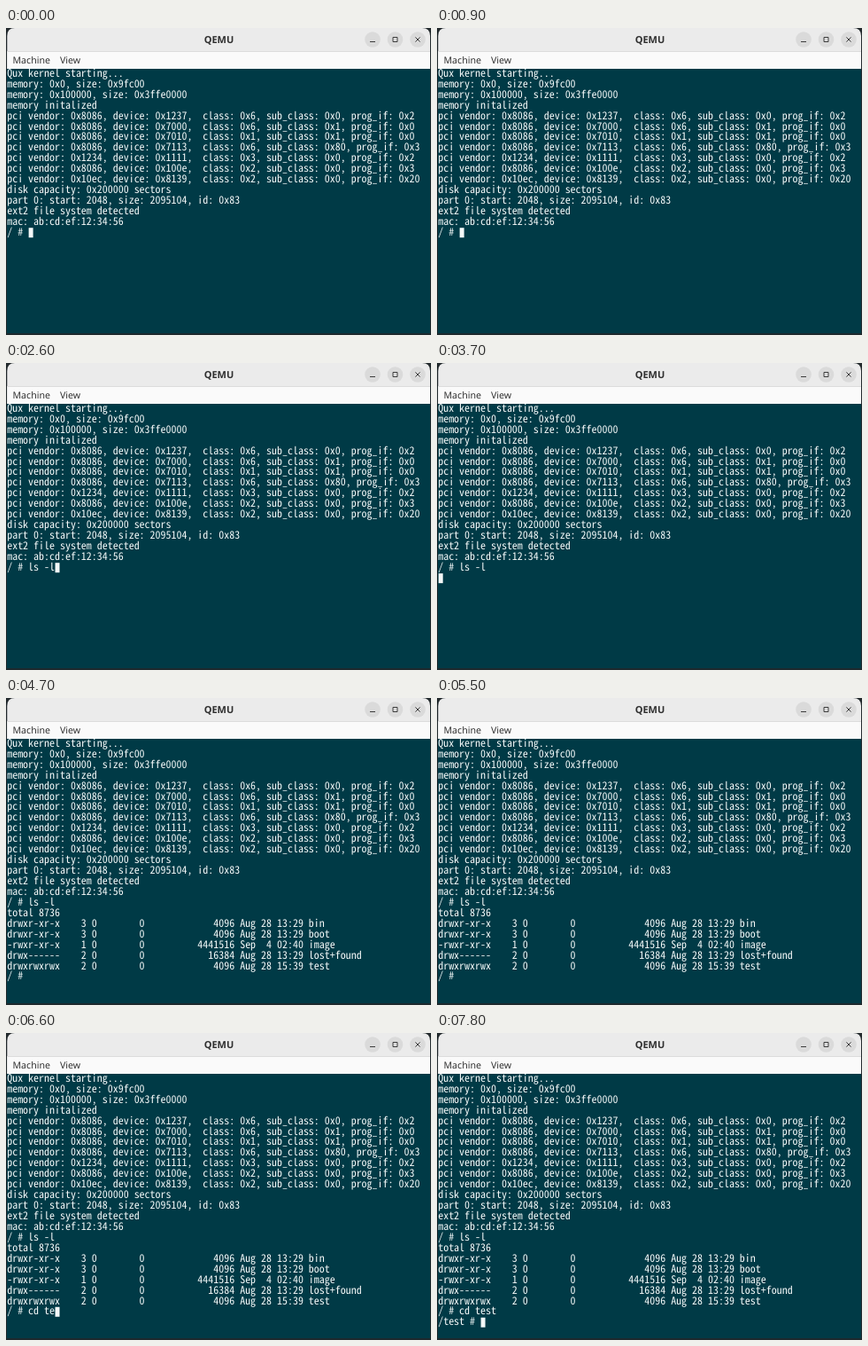
An HTML page for the animation above (8 s loop, 480 by 346 pixels).

```html
<!DOCTYPE html>
<html lang="en">
<head>
<meta charset="utf-8">
<title>Kernel console</title>
<style>
  html, body { margin: 0; width: 100%; height: 100%; overflow: hidden; background: #232a2d; }
  svg { display: block; width: 480px; height: 346px; }
  text { white-space: pre; text-rendering: geometricPrecision; }
  .ui { font: 10.6px "Noto Sans", "Open Sans", sans-serif; fill: #333; }
  .title { font-size: 11px; font-weight: 700; fill: #303030; text-anchor: middle; }
  .term { font-family: "Noto Sans Mono CJK JP", "Noto Sans Mono", "DejaVu Sans Mono", monospace; fill: #f4f8f8; }
</style>
</head>
<body>
<svg viewBox="0 0 480 346">
  <path d="M1.3 346V9Q1.3 0 10 0H470Q479 0 479 9V346Z" fill="#ebebeb"/>
  <path d="M1.3 26H479V46H1.3Z" fill="#fafafa"/>
  <path d="M1.3 26H479V27H1.3Z" fill="#dcdcdc"/>
  <path d="M1 46H479V344H1Z" fill="#003a46"/>
  <path d="M0 344H480V346H0Z" fill="#1d292d"/>
  <g fill="#dadada">
    <circle cx="414" cy="13" r="8.8"/>
    <circle cx="439.5" cy="13" r="8.8"/>
    <circle cx="465" cy="13" r="8.8"/>
  </g>
  <path d="M411 15.5h6M437 10.5h5v5h-5zM462.4 10.4l5.2 5.2M467.6 10.4l-5.2 5.2" fill="none" stroke="#3c3c3c"/>
  <text class="ui title" x="240.5" y="17">QEMU</text>
  <text class="ui" x="7.5" y="40">Machine</text>
  <text class="ui" x="61" y="40">View</text>
  <g class="term" id="term"></g>
  <rect id="cursor" width="5" height="11" fill="#f4f8f8"/>
</svg>
<script>
const LEFT = 1.2, TOP = 45.6, CW = 5.98, LH = 11.94, LOOP = 8000;
const term = document.getElementById('term');
const cursor = document.getElementById('cursor');

const pci = (vendor, device, cls, sub, prog) =>
  `pci vendor: 0x${vendor}, device: 0x${device},  class: 0x${cls}, sub_class: 0x${sub}, prog_if: 0x${prog}`;
const file = (mode, links, size, date, name) =>
  `${mode}    ${links} 0        0${String(size).padStart(17)} ${date} ${name}`;

const boot = [
  'Qux kernel starting...',
  'memory: 0x0, size: 0x9fc00',
  'memory: 0x100000, size: 0x3ffe0000',
  'memory initalized',
  pci('8086', '1237', 6, 0, 2),
  pci('8086', '7000', 6, 1, 0),
  pci('8086', '7010', 1, 1, 0),
  pci('8086', '7113', 6, 80, 3),
  pci('1234', '1111', 3, 0, 2),
  pci('8086', '100e', 2, 0, 3),
  pci('10ec', '8139', 2, 0, 20),
  'disk capacity: 0x200000 sectors',
  'part 0: start: 2048, size: 2095104, id: 0x83',
  'ext2 file system detected',
  'mac: ab:cd:ef:12:34:56',
  '/ # '
].join('\n');

const listing = boot + [
  'ls -l',
  'total 8736',
  file('drwxr-xr-x', 3, 4096, 'Aug 28 13:29', 'bin'),
  file('drwxr-xr-x', 3, 4096, 'Aug 28 13:29', 'boot'),
  file('-rwxr-xr-x', 1, 4441516, 'Sep  4 02:40', 'image'),
  file('drwx------', 2, 16384, 'Aug 28 13:29', 'lost+found'),
  file('drwxrwxrwx', 2, 4096, 'Aug 28 15:39', 'test'),
  '/ # '
].join('\n');

// [start time, screen text, cursor visible]
const steps = [
  [0, boot, 1], [600, boot, 0], [900, boot, 1], [1600, boot, 0], [1900, boot, 1],
  [2000, boot + 'l', 1], [2100, boot + 'ls', 1], [2300, boot + 'ls ', 1],
  [2400, boot + 'ls -', 1], [2600, boot + 'ls -l', 1],
  [3600, boot + 'ls -l\n', 0], [3700, boot + 'ls -l\n', 1],
  [4700, listing, 0], [4800, listing, 1], [5500, listing, 0], [5800, listing, 1],
  [6100, listing + 'c', 1],
  ...[2, 3, 4, 5, 6, 7].map((n, i) => [6300 + i * 100, listing + 'cd test'.slice(0, n), 1]),
  [7000, listing + 'cd test\n/test # ', 0], [7800, listing + 'cd test\n/test # ', 1]
];

// Choose the font size whose natural advance equals one console cell.
const ctx = document.createElement('canvas').getContext('2d');
ctx.font = '100px ' + getComputedStyle(term).fontFamily;
term.style.fontSize = CW * 100 / ctx.measureText('0').width + 'px';

const rows = Array.from({ length: 25 }, (_, i) => {
  const row = document.createElementNS('http://www.w3.org/2000/svg', 'text');
  row.setAttribute('x', LEFT);
  row.setAttribute('y', TOP + i * LH + 9.2);
  return term.appendChild(row);
});

let shown;
function draw() {
  const t = performance.now() % LOOP;
  const step = steps.findLast(s => s[0] <= t);
  if (step !== shown) {
    shown = step;
    const lines = step[1].split('\n');
    rows.forEach((row, i) => { row.textContent = lines[i] || ''; });
    const last = lines.length - 1;
    cursor.setAttribute('x', LEFT + lines[last].length * CW + 0.5);
    cursor.setAttribute('y', TOP + last * LH + 0.5);
    cursor.setAttribute('visibility', step[2] ? 'visible' : 'hidden');
  }
  requestAnimationFrame(draw);
}
draw();
</script>
</body>
</html>
```
